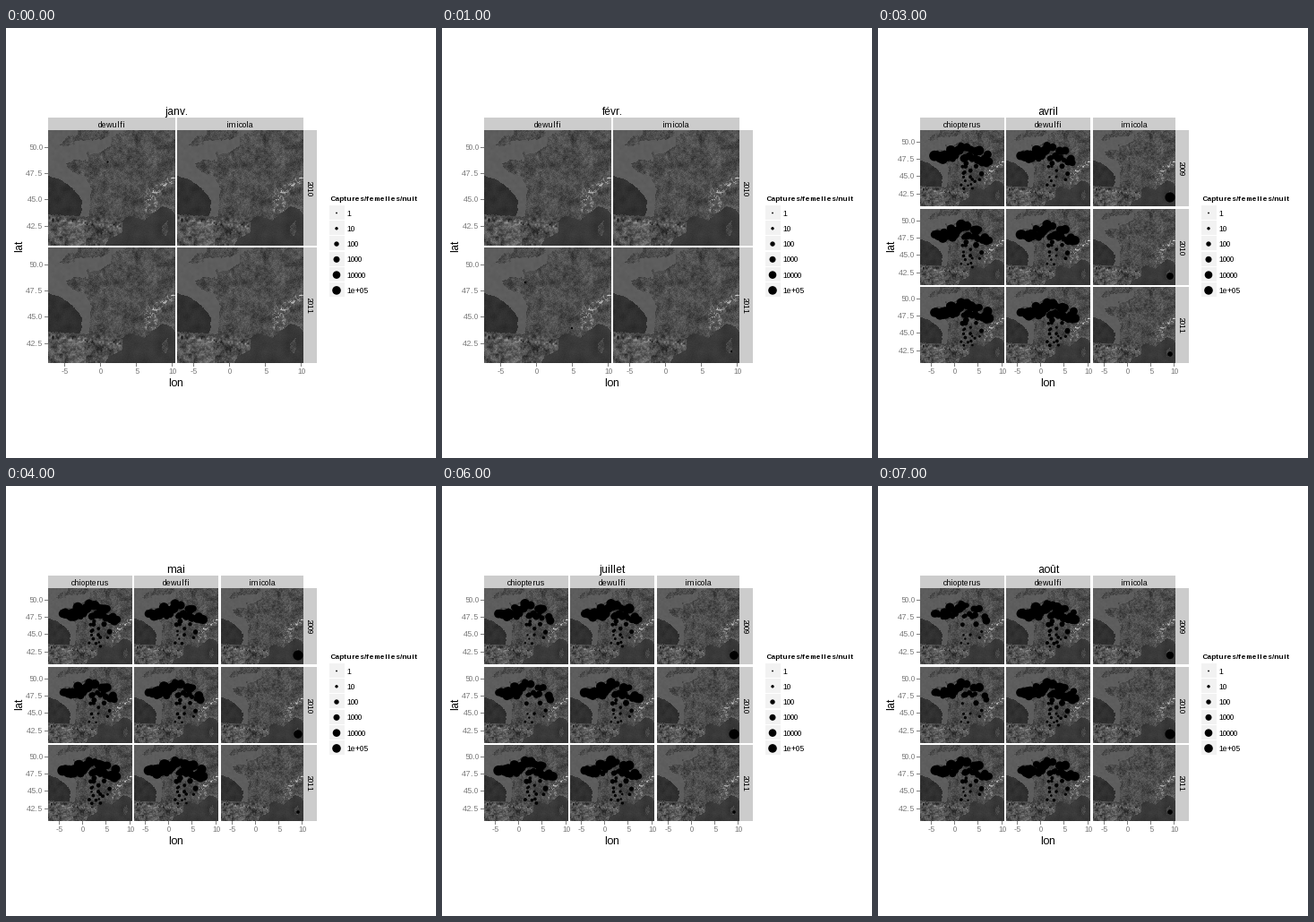
Recreate the animation shown at these times as a matplotlib script. Size 480 by 480 pixels, loop 8 s.

```python
import numpy as np
import matplotlib.pyplot as plt
from matplotlib.animation import FuncAnimation
from matplotlib.patches import Rectangle
from matplotlib.path import Path

plt.rcParams.update({
    "font.family": "Liberation Sans",
    "text.hinting": "force_autohint", "text.hinting_factor": 1,
})
SIZE, DPI = 480, 100
GREY = "#7f7f7f"
MONTHS = ["janv.", "févr.", "mars", "avril", "mai", "juin", "juillet", "août"]
W, H = 142, 129

# Panel edges in stage pixels for the two layouts
WIDE = [(47, 189), (191, 332)], [(114, 243), (245, 374)]
DENSE = [(47, 141), (143, 237), (240, 332)], [(114, 199), (202, 287), (289, 374)]

fig = plt.figure(figsize=(SIZE / DPI, SIZE / DPI), dpi=DPI, facecolor="white")
ax = fig.add_axes([0, 0, 1, 1])
rng = np.random.default_rng(11)


# ---- grey relief map -------------------------------------------------
def noise(k):
    """Smooth noise with cells of k pixels, about -1 to 1."""
    n = np.kron(rng.uniform(-1, 1, (H // k + 3, W // k + 3)), np.ones((k, k)))
    for axis in (0, 1):
        n = sum(np.roll(n, s, axis) for s in range(k)) / k
    return n[k:H + k, k:W + k]


def make_map():
    u, v = np.meshgrid(np.arange(W) + .5, np.arange(H) + .5)
    lon, lat = u / 8 - 7.25, 50 - (v - 19) / 11.7
    rough = np.c_[(lon + .1 * noise(2)).ravel(), (lat + .08 * noise(2)).ravel()]

    def inside(pts):
        return Path(pts).contains_points(rough).reshape(H, W)

    mainland = inside([
        (3.6, 51.8), (1.6, 50.9), (1.5, 50.1), (.1, 49.5), (-1.2, 49.35),
        (-1.9, 49.7), (-1.5, 48.65), (-3.5, 48.8), (-4.75, 48.4), (-4.4, 47.85),
        (-2.1, 47.1), (-1.2, 46.1), (-1.6, 43.4), (-8, 43.6), (-8, 40), (.4, 40),
        (1, 41.1), (3.2, 41.9), (3.1, 43), (4, 43.5), (6.2, 43.05), (7.5, 43.75),
        (8.8, 44.4), (10.1, 44), (12, 42), (12, 52)])
    north = inside([
        (-5.6, 50.1), (-3.6, 50.2), (-3.4, 50.6), (.3, 50.75), (1.4, 51.2),
        (1, 52), (-3, 52), (-3.2, 51.2), (-4.5, 51.1)])
    isle = inside([(8.6, 42.4), (9.4, 43), (9.5, 42.1), (9.2, 41.4), (8.7, 41.7)])
    land = mainland | north | isle
    deep = ~land & inside([
        (-8, 47.45), (-5.5, 46.9), (-4.1, 46.25), (-3.1, 45.5), (-2.55, 44.8),
        (-2.7, 43.3), (-8, 43.3)])
    med = (lon > 0) & (lat < 44.6) & ~land

    img = .365 + .012 * noise(3)
    img[deep] = (.185 + .03 * noise(6) + .01 * noise(1))[deep]
    img[med] = (.215 + .03 * noise(9) + .01 * noise(1))[med]
    ground = .295 + .045 * noise(1) + .06 * noise(3) + .06 * noise(10)

    iberia = np.clip((43.5 - lat) * 2, 0, 1) * (lon < 3.3)
    ground += iberia * (.03 + .08 * noise(2) + .1 * noise(5))
    ridge = np.exp(-((lat - 42.75 + .08 * (lon + 2)) / .25) ** 2) * (lon < 3)
    ground += ridge * (.05 + .2 * noise(2))

    arc = np.interp(lat, [43.9, 45.2, 46.1, 46.8], [7.1, 6.9, 7.9, 10])
    alps = np.exp(-((lon - arc) / 1.0) ** 2) * (lat > 43.8) * (lat < 47.2)
    peaks = noise(2) + .5 * noise(1)
    ground += alps * (.02 + .45 * np.clip(peaks - .1, 0, 1))
    img[land] = ground[land]
    return np.clip(img, .1, .9)


# ---- traps and captures ----------------------------------------------
def make_sites():
    """Trap places in a dense panel: a northern band and a thin southern tail."""
    def crest(u):
        return np.interp(u, [15, 37, 51, 64, 77], [28, 20, 12, 19, 28])

    u = np.linspace(16, 77, 40)
    depth = np.interp(u, [16, 40, 60, 77], [2, 20, 18, 9])
    v = crest(u) + depth * rng.random(u.size)
    u = np.r_[u, rng.uniform(33, 70, 20)]
    v = np.r_[v, rng.uniform(36, 66, 20)]
    weight = np.clip(1.15 - (v - crest(u)) / 42, .35, 1)
    # Western sites wake up first
    order = np.argsort(np.hypot(u - 36, v - 33) + rng.uniform(0, 40, u.size))
    return np.c_[u, v, weight][order]


# Activity from 0 to 1 per species (rows) and year (columns)
ACTIVITY = {
    "mars": [(.3, .2, .7), (.05, .07, .1), (0, .2, .5)],
    "avril": [(1, .9, 1), (.8, .85, 1), (1, .7, .5)],
    "juin": [(.85, .7, 1), (.85, .75, .95), (1, 1, .15)],
    "août": [(.65, .65, .85), (1, 1, .85), (.75, 1, .5)],
}
for mid, a, b in (("mai", "avril", "juin"), ("juillet", "juin", "août")):
    ACTIVITY[mid] = (np.array(ACTIVITY[a]) + ACTIVITY[b]) / 2

EARLY = {"janv.": [(113, 149, 1)],
         "févr.": [(93, 284, 1.3), (145, 335, 1.1), (323, 361, 1)]}


def captures(month):
    if month in EARLY:
        return EARLY[month]
    spread = np.random.default_rng(MONTHS.index(month))
    cols, rows = DENSE
    dots = []
    for (x0, _), levels in zip(cols, ACTIVITY[month]):
        for (y0, _), level in zip(rows, levels):
            if x0 == cols[-1][0]:
                dots.append((x0 + 86, y0 + 75, 5.6 * level))
                continue
            for u, v, weight in SITES[:round(len(SITES) * level)]:
                r = 5.2 * weight * level ** .4 * spread.uniform(.65, 1.15)
                dots.append((x0 + u, y0 + v, r))
    return dots


MAP = make_map()
SITES = make_sites()


# ---- drawing ----------------------------------------------------------
def box(x0, y0, x1, y1, color):
    ax.add_patch(Rectangle((x0, y0), x1 - x0, y1 - y0, fc=color, lw=0, snap=False))


def label(x, y, s, px=9, color="black", ha="center", va="center", **kw):
    ax.text(x, y, s, fontsize=px * 72 / DPI, color=color, ha=ha, va=va, **kw)


def discs(dots):
    x, y, r = np.array(dots).T
    ax.scatter(x, y, s=(2 * r * 72 / DPI) ** 2, c="black", linewidths=0, zorder=3)


def legend():
    label(361, 193, "Captures/femelles/nuit", 7.8, ha="left", va="baseline", weight="bold")
    names = ["1", "10", "100", "1000", "10000", "1e+05"]
    rows = 206.5 + 17.28 * np.arange(6)
    for y, name in zip(rows, names):
        top = round(y - 8.6)
        box(361, top, 378, top + 16, "#f2f2f2")
        label(380, y + .5, name, ha="left")
    discs([(369, y, r) for y, r in zip(rows, (.9, 1.7, 2.7, 3.5, 4.3, 4.8))])


def panels(cols, rows, species, years, lon0, lon_step, lat0, lat_step):
    for (x0, x1), kind in zip(cols, species):
        box(x0, 100, x1, 114, "#cccccc")
        label((x0 + x1) / 2, 111, kind, va="baseline")
        for y0, y1 in rows:
            ax.imshow(MAP, cmap="gray", vmin=0, vmax=1, extent=(x0, x1, y1, y0),
                      interpolation="nearest", aspect="auto")
        for deg in (-5, 0, 5, 10):
            x = round(x0 + lon0 + lon_step * deg)
            box(x, 374, x + 1, 378, GREY)
            label(x + .5, 384, f"{deg}", color=GREY)
    for (y0, y1), year in zip(rows, years):
        box(332, y0, 347, y1, "#cccccc")
        label(338, (y0 + y1) / 2, year, rotation=-90)
        for k in range(4):
            y = round(y0 + lat0 + lat_step * k)
            box(43, y, 47, y + 1, GREY)
            label(41, y + .5, f"{50 - 2.5 * k:.1f}", color=GREY, ha="right")


def draw(i):
    ax.clear()
    ax.axis("off")
    if i < 2:
        panels(*WIDE, ["dewulfi", "imicola"], ["2010", "2011"], 58, 8, 19, 29.2)
    else:
        panels(*DENSE, ["chiopterus", "dewulfi", "imicola"], ["2009", "2010", "2011"],
               38, 5.25, 13, 19.2)
    label(190, 97, MONTHS[i], 12, va="baseline")
    label(190, 400, "lon", 12, va="baseline")
    label(15, 243, "lat", 12, rotation=90)
    legend()
    discs(captures(MONTHS[i]))
    ax.set_xlim(0, SIZE)
    ax.set_ylim(SIZE, 0)
    return []


anim = FuncAnimation(fig, draw, frames=len(MONTHS), interval=1000,
                     init_func=lambda: [], repeat=True, repeat_delay=0)
plt.show()
```
